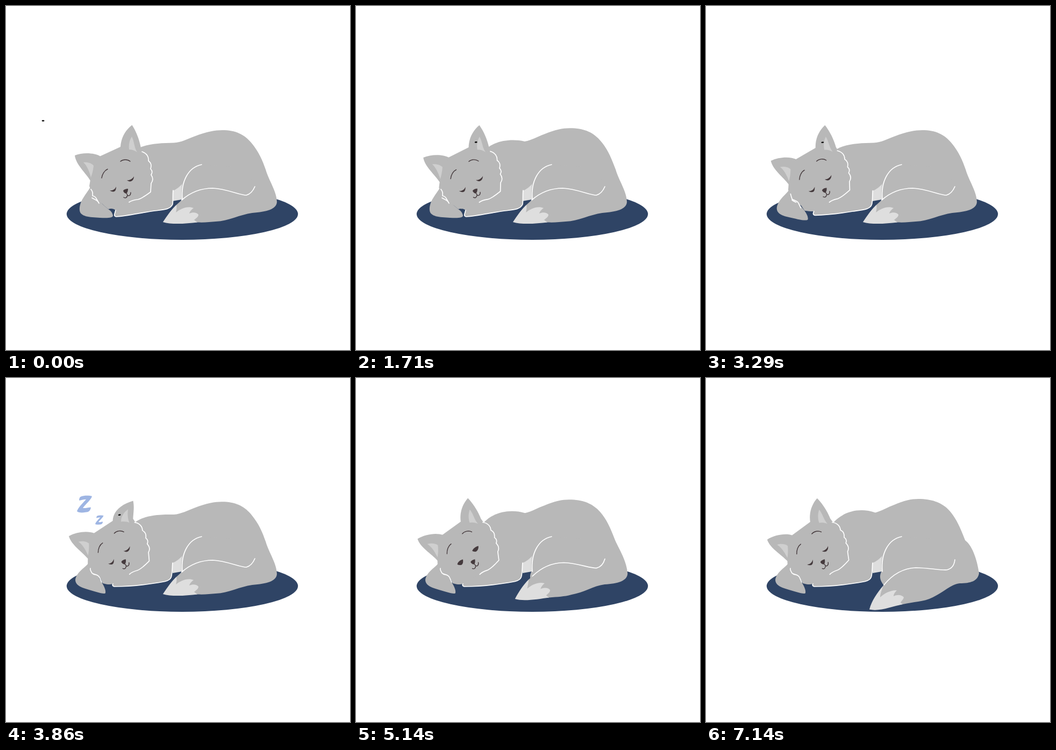
Animation of 640x640 px, one loop 7210 ms. Source, as an HTML page:

```html
<!DOCTYPE html>
<html lang="en">
<head>
<meta charset="utf-8">
<title>Sleeping fox</title>
<style>
  html, body { margin: 0; width: 100%; height: 100%; overflow: hidden; background: #fff; }
  svg { display: block; width: 100%; height: 100%; }
  .fur { fill: #b8b8b8; }
  .pale { fill: #dedede; }
  .inner { fill: #cfcfcf; }
  .dark { fill: #453a3d; }
  .line, .ink { fill: none; stroke-linecap: round; stroke-linejoin: round; }
  .line { stroke: #fff; stroke-width: 1.7; }
  .ink { stroke: #453a3d; stroke-width: 1.4; }
</style>
</head>
<body>
<svg viewBox="0 0 640 640">
  <defs>
    <path id="z" d="M143 194C150 191 160 192 164 193C163 199 152 208 147 215C152 216 158 213 162 214C161 220 158 223 152 223C146 224 138 224 136 221C139 213 148 205 153 199C148 199 143 201 140 201C140 198 141 195 143 194Z"/>
  </defs>
  <ellipse cx="328" cy="387" rx="215.200" ry="47.900" fill="#2f4465"/>
  <path id="body" class="fur"/>
  <path class="pale" d="M310 344C318 341 324 335 328 331C326 340 326 350 327 360L310 363Z"/>
  <path class="fur" d="M328 331C326 340 326 350 327 359C322 368 323 376 331 386L420 374L478 352L440 300L364 295C345 299 334 312 328 331Z"/>
  <path id="tail" class="fur"/>
  <path id="tip" class="pale"/>
  <path class="line" d="M364 295C340 300 325 325 328 360"/>
  <path id="tailLine" class="line"/>
  <path id="arm" class="fur"/>
  <path id="paw" class="fur"/>
  <g id="head">
    <path class="fur" d="M157 325C148 310 130 295 128 278C143 272 165 273 176 280L180 300Z"/>
    <path class="inner" d="M144 291C152 290 160 293 163 297C162 307 160 313 158 319C155 307 150 296 144 291Z"/>
    <path id="ear" class="fur"/>
    <path class="fur" d="M157 323L175 279.500L213 262L251 264L268 300L268 345L230 365L195 376L165 360L155 335Z"/>
    <path id="earIn" class="inner"/>
    <path class="line" d="M253 271C262 274 266 281 265 288C270 292 271 296 269 303C273 307 272 311 270 314C274 320 274 325 270 330L269 346C261 352 253 358 245 360C237 361 233 362 229 365"/>
    <g id="face">
      <path class="ink" d="M178 320C179 313 183 306 189 303.500M213 289C218 285 226 285 231 289"/>
      <path id="eyes" class="dark"/>
      <path class="dark" d="M218 344C219 341 224 340 227 340C227 344 226 348 223 349C220 348 219 346 218 344Z"/>
      <path class="ink" d="M224 348L226 352C225 357 222 358 219 356M226 352C228 354 232 353 232 347"/>
    </g>
    <ellipse id="fly" rx="2.500" ry="1.300"/>
  </g>
  <path id="cheek" class="line"/>
  <path id="armLine" class="line"/>
  <g id="zs" fill="#8faadf">
    <use href="#z"/>
    <use href="#z" transform="translate(95.2 123) scale(.55)"/>
  </g>
</svg>
<script>
const LOOP = 7210, FPS = 14, LAST = 100;
const $ = id => document.getElementById(id);
const clamp = v => Math.max(0, Math.min(1, v));
const lerp = (a, b, k) => a + (b - a) * k;
const ramp = (t, a, b) => clamp((t - a) / (b - a));
const ease = (t, a, b) => (1 - Math.cos(Math.PI * ramp(t, a, b))) / 2;

// Pairs of paths with the same commands, blended number by number.
const shapes = {
  body: [
    "M225 285L241 268C258 256 288 255 312 254.5C326 254 338 247 352 242C372 234 390 231 402 231C428 231 443 239 456 254C471 272 477 287 483 304L488 364L330 360L230 360Z",
    "M225 285L238 268C255 249 285 240 315 250.5C328 247 338 240 350 236C368 228 382 225 395 225C421 225 436 232 447 241C465 257 474 281 483 304L488 364L330 360L230 360Z"
  ],
  tail: [
    "M317 370L327 361C345 345 365 339 385 339C410 340 435 352 447 352C455 350 460 343 463 336L483 304C489 325 504 345 504 365C503 378 485 383 458 385C435 388 415 400 390 401C380 402 370 403 356 402.5L292 402Z",
    "M330 386L331 385C345 368 365 354 390 353C415 353 435 358 448 357C457 355 462 348 463 338L482 302C494 310 504 335 508 363C506 378 492 382 472 382C455 384 443 398 422 408C404 417 386 416 366 421L304 430.5Z"
  ],
  tip: [
    "M292 402C300 390 308 378 317 370C318 376 317 381 316 384C325 377 338 371 349 376C346 378 342 382 341 386C348 383 355 384 358 388C358 393 353 395 350 398L356 402.5C335 405 308 407 292 402Z",
    "M304 430.5C308 415 318 400 330 386C327 394 324 402 324 408C331 401 344 394 355 395C352 398 349 402 349 406C357 402 365 404 368 408C367 413 363 415 362 418L366 421C346 425 322 435 304 430.5Z"
  ],
  tailLine: [
    "M327 361C345 345 365 339 385 339C410 340 435 352 447 352C455 350 460 343 463 336",
    "M331 385C345 368 365 354 390 353C415 353 435 358 448 357C457 355 462 348 463 338"
  ],
  arm: [
    "M311 343C310 352 311 362 310 369C305 380 290 379 270 382C245 386 222 391 205 392C199 391 203 385 204 380C200 377 196 376 190 378L170 360L240 330L300 330Z",
    "M310 344C309 352 310 358 308 368C307 377 298 379 275 382C250 386 222 388 202 388C197 387 198 384 199 383C193 385 187 384 180 382L170 360L240 330L300 330Z"
  ],
  armLine: [
    "M311 343C310 352 311 362 310 369C305 380 290 379 270 382C245 386 222 391 205 392C199 391 203 385 204 380",
    "M310 344C309 352 310 358 308 368C307 377 298 379 275 382C250 386 222 388 202 388C197 387 198 384 199 383"
  ],
  paw: [
    "M158 335C150 350 136 362 137 380C138 392 155 393 175 394C190 395 199 394 199 390C198 384 194 380 190 378L170 360Z",
    "M154 344C148 352 130 362 129 376C130 390 150 392 168 398C178 401 184 402 185 400C186 395 183 388 178 380L165 360Z"
  ],
  cheek: [
    "M158 341C163 347 161 350 161 353C168 355 167 357 169 360L173 367M160 357C165 360 169 361 171 364",
    "M157 354C156 357 158 359 160 363C168 367 172 366 174 371L178 380M160 363C162 365 164 366 166 366"
  ],
  ear: [
    "M213 262C214 245 222 231 234.5 221.5C242 233 248 248 251 264L232 285Z",
    "M213 262C216 245 233 234 256 231C257 243 252 257 251 264L232 285Z"
  ],
  earIn: [
    "M234 243C229 251 228 260 229 267C235 267 240 269 244 272C238 263 239 252 234 243Z",
    "M244.5 245C234 250 229 258 228 266C234 266 240 268 243 270C241 262 242 252 244.5 245Z"
  ],
  eyes: [
    "M193 343C198 344 203 341 205 336C205 342 203 346 199 345.5C196 345 194 344 193 343ZM225 324C230 325 236 321 238 317C238 323 234 327 230 326.5C228 326 226 325 225 324Z",
    "M193 343C195 338.5 200 336 205 336C205 341 203 346 199 345.5C196 345 194 344 193 343ZM225 324C227 320 233 317 238 317C238 322 234 327 230 326.5C228 326 226 325 225 324Z"
  ]
};

function morph(id, k) {
  const [a, b] = shapes[id];
  const to = b.match(/[\d.]+/g);
  let i = 0;
  $(id).setAttribute("d", a.replace(/[\d.]+/g, n => lerp(+n, +to[i++], k).toFixed(2)));
}

const place = (id, x, y) => $(id).setAttribute("transform", `translate(${x} ${y})`);

function breathAt(t) {
  if (t > 2.4 && t < 3.6) return 0;
  const s = t < 3 ? t : t - 3.6;
  return (1 - Math.cos(2 * Math.PI * s / 2.4)) / 2;
}

function drawFly(t) {
  const come = ease(t, 0, 0.85), go = ramp(t, 3.95, 4.45);
  const x = lerp(69, 227, come) - 27 * go;
  const y = lerp(213.5, 253, come) - 28 * Math.sin(Math.PI * come) - 85 * go;
  place("fly", x, y);
  $("fly").setAttribute("opacity", go < 1 ? 1 : 0);
}

function drawZs(t) {
  const start = t < 1.9 ? 0 : t < 3.3 ? 2 : 3.6;
  const age = t - start, late = start > 3;
  place("zs", late ? -4 : 0, 20.2 - 28.5 * age + (late ? 14 : 0));
  $("zs").setAttribute("opacity", ramp(age, 0, 0.3) * (1 - ramp(age, 0.85, 1.1)));
}

function draw(t) {
  const breath = breathAt(t);
  const shift = ease(t, 2.8, 3.6);
  const sweep = ease(t, 4.76, 5.76);
  const twitch = ease(t, 3.6, 3.8) - ease(t, 3.95, 4.15);

  morph("body", breath);
  for (const id of ["tail", "tip", "tailLine"]) morph(id, sweep);
  for (const id of ["arm", "armLine", "paw", "cheek"]) morph(id, shift);
  for (const id of ["ear", "earIn"]) morph(id, twitch);
  morph("eyes", ease(t, 4.5, 4.8) - ease(t, 5.6, 5.9));

  const nudge = -0.8 * shift, angle = -8.2 * shift - 3.5 * breath;
  $("head").setAttribute("transform", `translate(${nudge} ${nudge}) rotate(${angle} 236 355)`);
  place("face", -0.6 * shift - breath, -3.4 * shift - 1.2 * breath);
  drawFly(t);
  drawZs(t);
}

const began = performance.now();
function tick() {
  const ms = (performance.now() - began) % LOOP;
  draw(Math.min(LAST, Math.floor(ms * FPS / 1000 + 0.1)) / FPS);
  requestAnimationFrame(tick);
}
tick();
</script>
</body>
</html>
```
